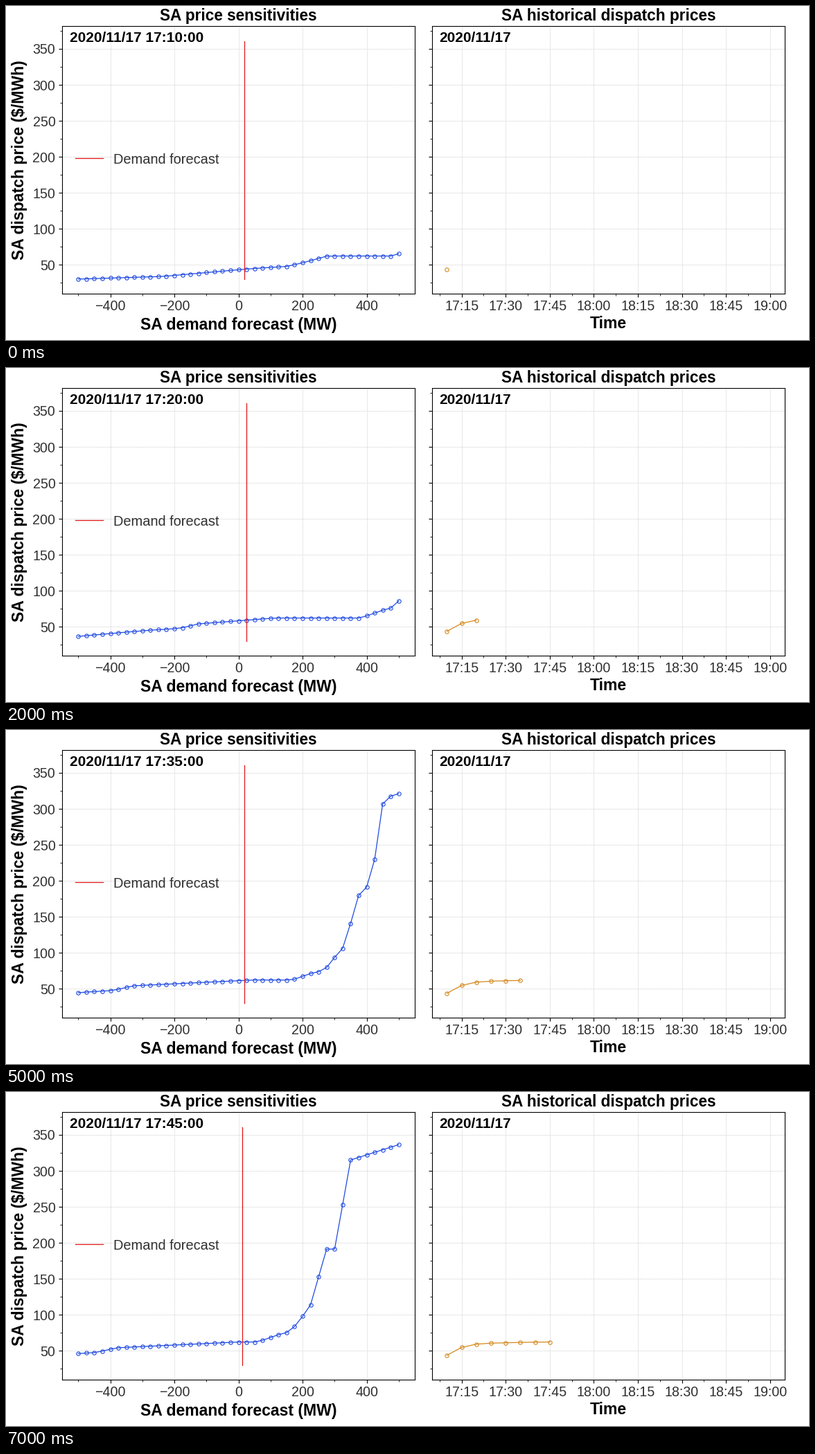
A matplotlib script that plays this animation: 1159x483 px, repeating every 8000 ms.

```python
import matplotlib.pyplot as plt
import numpy as np
from matplotlib.animation import FuncAnimation
from matplotlib.ticker import AutoMinorLocator, FuncFormatter, MultipleLocator

W, H, DPI = 1159, 483, 100
PX = 72 / DPI
BLUE, RED, ORANGE, GREY = "#1f49e0", "#e01414", "#d4881c", "#303030"
STEPS = 8
START = 17 * 60 + 10  # minutes after midnight

plt.rcParams.update({"font.family": "Liberation Sans", "axes.linewidth": 0.8})

demand = np.arange(-500, 501, 25)

# Steps of the expensive bids, relative to the peak: start, width, rise
PEAK_RAMPS = [(-190, 70, 11), (-110, 25, 5), (-85, 50, 28),
              (-30, 55, 85), (55, 40, 123), (95, 155, 22)]


def forecast_at(t):
    return np.interp(t, [0, 3, 4, 7], [19, 29, 21, 11.8])


def price(t, x):
    """Supply curve: cheap bids, a plateau and a peak that all drift left."""
    x = np.asarray(x, dtype=float)
    cheap_end = -430 + 642 * np.exp(-t / 2.7)
    plateau = max(cheap_end + 65, 160 - 23 * t)
    peak = np.interp(t, [0, 3, 4, 6, 7], [670, 522, 393, 322, 250])
    knots = cheap_end + np.array([-700, -450, -220, -150, -60, 0])
    result = np.interp(x, [*knots, plateau], [30.5, 34, 43, 45.5, 48, 54.3, 62.4])
    for start, width, rise in PEAK_RAMPS:
        result = result + rise * np.clip((x - peak - start) / width, 0, 1)
    return result


def clock(minutes, _=None):
    return f"{int(minutes) // 60:02d}:{int(minutes) % 60:02d}"


history_x = START + 5 * np.arange(STEPS)
history_y = [float(price(t, forecast_at(t))) for t in range(STEPS)]

fig = plt.figure(figsize=(W / 100, H / 100), dpi=DPI, facecolor="white")


def write(x, y, text, size, weight="bold", **kw):
    """Text with its baseline at pixel (x, y), measured from the top left."""
    return fig.text(x / W, 1 - y / H, text, fontsize=size * PX,
                    fontweight=weight, va="baseline", **kw)


def panel(left, xlim, step):
    top, bottom, width = 29.4, 415.6, 508.7
    ax = fig.add_axes([left / W, 1 - bottom / H, width / W, (bottom - top) / H])
    ax.set(xlim=xlim, ylim=(10.5, 381.3))
    ax.xaxis.set_major_locator(MultipleLocator(step))
    ax.yaxis.set_major_locator(MultipleLocator(50))
    ax.xaxis.set_minor_locator(AutoMinorLocator(2))
    ax.yaxis.set_minor_locator(AutoMinorLocator(2))
    ax.tick_params(labelsize=19.6 * PX, labelcolor=GREY)
    ax.grid(color="#b8b8b8", linestyle=":", linewidth=0.6)
    ax.set_axisbelow(True)
    return ax


def dotted_line(ax, color):
    return ax.plot([], [], "o-", color=color, lw=0.9, ms=5.4 * PX, mew=0.8,
                   mfc="none", clip_on=False)[0]


left_ax = panel(81.2, (-550, 550), 200)
right_ax = panel(615.2, (17 * 60 + 5, 19 * 60 + 5), 15)
right_ax.xaxis.set_major_formatter(FuncFormatter(clock))
right_ax.tick_params(labelleft=False)

write(335.6, 21, "SA price sensitivities", 22.6, ha="center")
write(869.7, 21, "SA historical dispatch prices", 22.6, ha="center")
write(335.6, 468, "SA demand forecast (MW)", 23, ha="center")
write(869.7, 466, "Time", 23, ha="center")
write(26.5, 222.5, r"SA dispatch price (\$/MWh)", 23,
      ha="center", rotation=90, rotation_mode="anchor")
write(155, 228, "Demand forecast", 20, "normal", color=GREY)
write(625.5, 51.5, "2020/11/17", 20.9)
stamp = write(91.5, 51.5, "", 20.9)

fig.add_artist(plt.Line2D([99.5 / W, 140 / W], [1 - 220.2 / H] * 2,
                          color=RED, lw=0.9))
curve = dotted_line(left_ax, BLUE)
forecast, = left_ax.plot([], [], color=RED, lw=0.9, zorder=3)
history = dotted_line(right_ax, ORANGE)


def update(t):
    curve.set_data(demand, price(t, demand))
    forecast.set_data([forecast_at(t)] * 2, [30, 361])
    history.set_data(history_x[:t + 1], history_y[:t + 1])
    stamp.set_text(f"2020/11/17 {clock(history_x[t])}:00")
    return curve, forecast, history, stamp


anim = FuncAnimation(fig, update, frames=STEPS, interval=1000, repeat=True)
plt.show()
```
